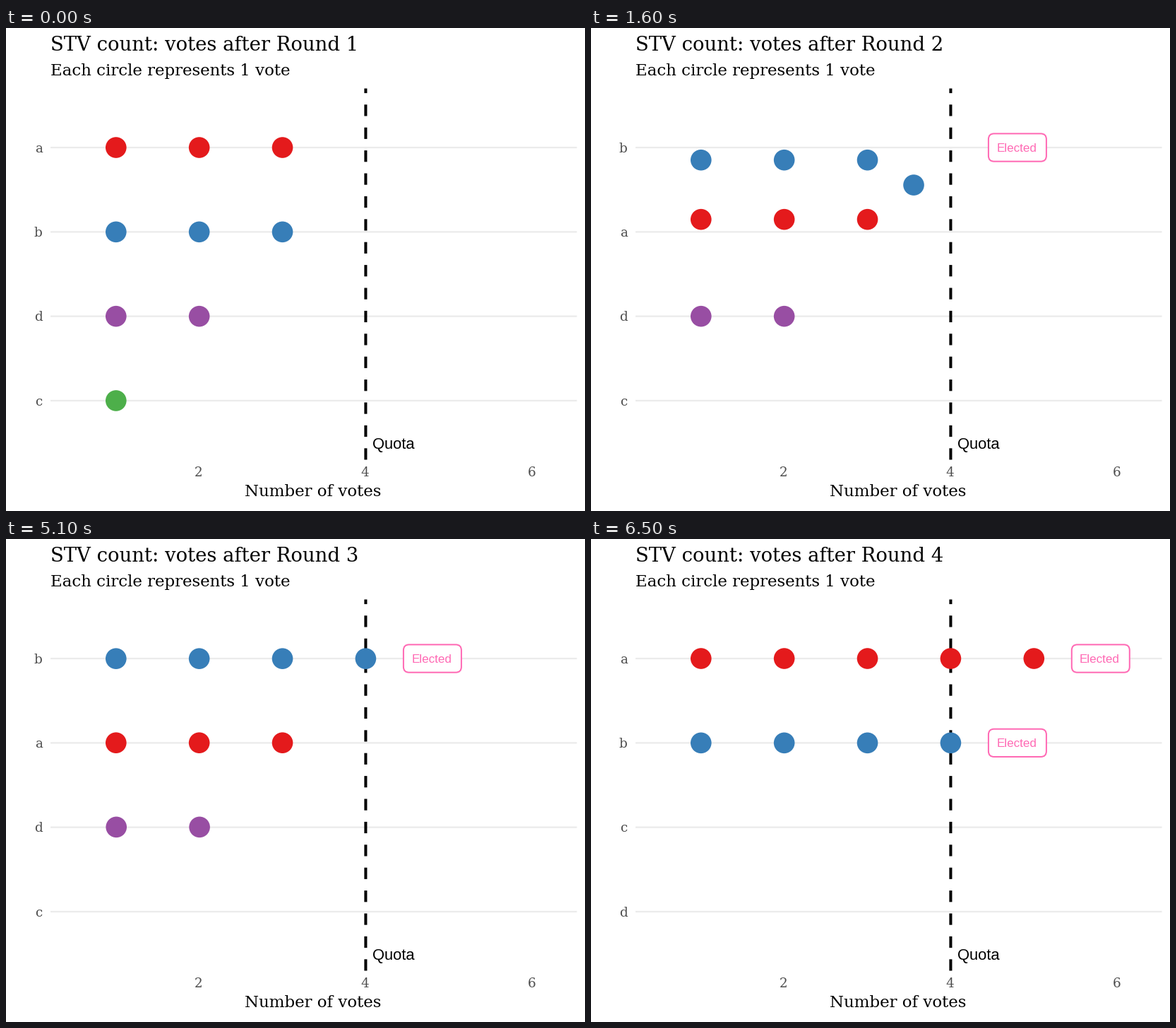
These frames come from a looping animation (820x683 px, 8000 ms). A matplotlib script:

```python
import matplotlib.pyplot as plt
from matplotlib.animation import FuncAnimation
from matplotlib.patches import Circle, FancyBboxPatch

W, H, DPI = 820, 683, 64
PX = 72 / DPI                      # points per pixel
LEFT, RIGHT, TOP, BOTTOM = 63, 808.5, 85.5, 610.5
ROW = (BOTTOM - TOP) / 4.4
QUOTA = 4
SERIF, SANS = "DejaVu Serif", "Liberation Sans"
PINK = "#FF69B4"
COLORS = dict(a="#E41A1C", b="#377EB8", c="#4DAF4A", d="#984EA3")

# Timing in frames of 100 ms
FRAMES, START, PERIOD, MOVE = 80, 6, 22, 15

# Ranking from top to bottom after each round
ORDERS = ["abdc", "badc", "badc", "abcd"]
# Candidate and place of every vote in each round
VOTES = [[(c, n)] * 4 for c in "ab" for n in (1, 2, 3)]
VOTES.append([("c", 1)] + [("b", 4)] * 3)
VOTES += [[("d", n)] * 3 + [("a", n + 3)] for n in (1, 2)]


def x_at(n):
    return 155.8 + 117.87 * (n - 1)


def y_at(row):
    return TOP + ROW * (0.7 + row)


def ease(t):
    return 4 * t ** 3 if t < 0.5 else 1 - 4 * (1 - t) ** 3


def spot(vote, rnd):
    cand, place = vote[rnd]
    return x_at(place), y_at(ORDERS[rnd].index(cand))


fig = plt.figure(figsize=(W / DPI, H / DPI), dpi=DPI, facecolor="white")
ax = fig.add_axes([0, 0, 1, 1])
ax.set_xlim(0, W)
ax.set_ylim(H, 0)
ax.axis("off")


def text(x, y, s, size, color="black", font=SERIF, ha="left", z=5):
    return ax.text(x, y, s, fontsize=size * PX, color=color, family=font,
                   ha=ha, va="baseline", zorder=z)


for row in range(4):
    ax.plot([LEFT, RIGHT], [y_at(row)] * 2, color="#EBEBEB", lw=2.22 * PX,
            solid_capstyle="butt", snap=False, zorder=1)
ax.plot([x_at(QUOTA)] * 2, [BOTTOM, TOP], color="black", lw=4.05 * PX,
        ls=(0, (4, 4)), dash_capstyle="butt", snap=False, zorder=2)

title = text(LEFT, 32, "", 27.5)
text(LEFT, 67, "Each circle represents 1 vote", 22.92)
text(435, 662, "Number of votes", 22.92, ha="center")
text(518.6, 595, "Quota", 22, font=SANS)
for n in (2, 4, 6):
    text(x_at(n) - 0.9, 634.4, str(n), 18.33, "#4D4D4D", ha="center")
names = [text(51.5, y_at(row) + 6.8, "", 18.33, "#4D4D4D", ha="right")
         for row in range(4)]

dots = [ax.add_patch(Circle((0, 0), 14.8, lw=0, zorder=3)) for _ in VOTES]


def make_badge():
    box = FancyBboxPatch((0, 0), 82, 39.3, zorder=4, fc="white", ec=PINK,
                         lw=2 * PX, boxstyle="round,pad=0,rounding_size=8")
    return ax.add_patch(box), text(0, 0, "Elected", 17, PINK, SANS, "center")


badges = {cand: make_badge() for cand in "ab"}


def draw(i):
    rnd, k = divmod(max(i - START, 0), PERIOD)
    nxt = min(rnd + 1, 3)
    p = ease(min(k / MOVE, 1))
    shown = nxt if k > MOVE / 2 else rnd    # labels and colours switch midway

    title.set_text(f"STV count: votes after Round {shown + 1}")
    for name, cand in zip(names, ORDERS[shown]):
        name.set_text(cand)

    for dot, vote in zip(dots, VOTES):
        (x0, y0), (x1, y1) = spot(vote, rnd), spot(vote, nxt)
        dot.center = x0 + (x1 - x0) * p, y0 + (y1 - y0) * p
        dot.set_facecolor(COLORS[vote[shown][0]])

    for cand, (box, label) in badges.items():
        count = sum(vote[shown][0] == cand for vote in VOTES)
        x, y = x_at(count + 0.8) + 0.2, y_at(ORDERS[shown].index(cand))
        box.set_bounds(x - 41, y - 19.65, 82, 39.3)
        label.set_position((x - 1.3, y + 5.9))
        for part in (box, label):
            part.set_visible(count >= QUOTA)
    return []


anim = FuncAnimation(fig, draw, frames=FRAMES, interval=100, repeat=True,
                     init_func=lambda: draw(0), blit=False)
plt.show()
```
